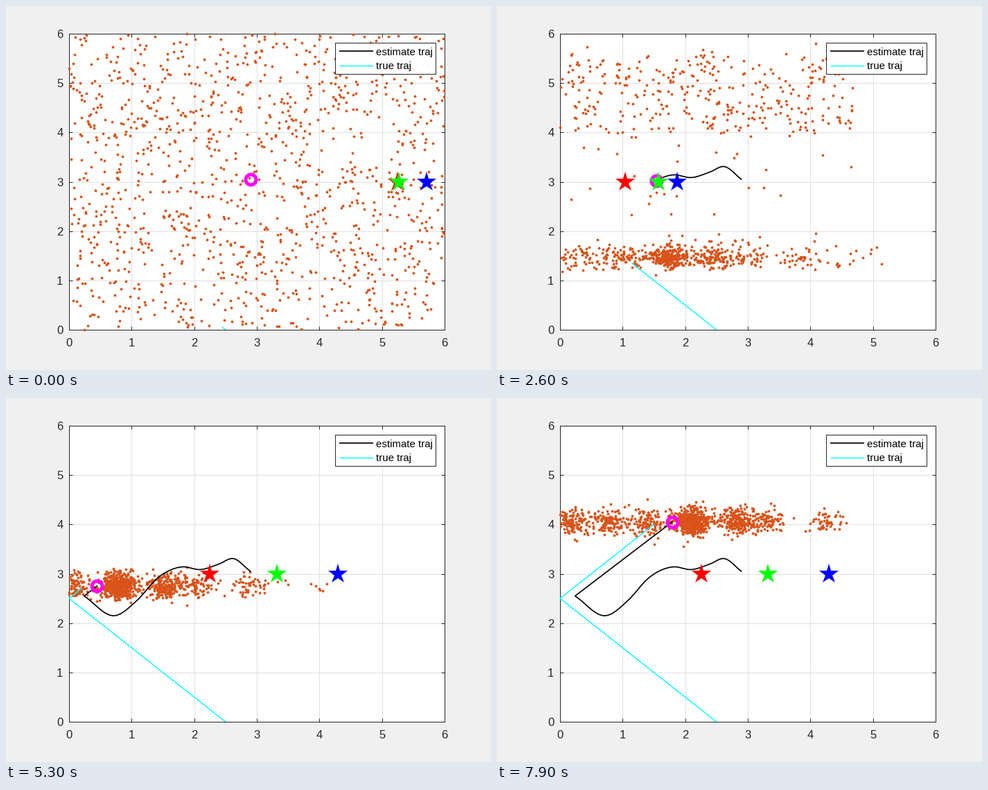
These frames come from a looping animation (700 by 525 pixels, 8000 ms). A matplotlib script:

```python
import numpy as np
import matplotlib.pyplot as plt
from matplotlib.animation import FuncAnimation
from matplotlib.patches import Rectangle

W, H, DPI = 700, 525, 100
FRAMES, BOUNCE, STEP = 80, 49, 0.05
PT = 72 / DPI  # points per pixel
INK = "#262626"
plt.rcParams["font.family"] = "Liberation Sans"
rng = np.random.default_rng(7)
ks = np.arange(FRAMES)
col = ks[:, None]

# Robot motion: up-left to the wall, then up-right
shift_x = STEP * (np.abs(col - BOUNCE) - BOUNCE)
shift_y = STEP * col
steps = np.arange(FRAMES + 1)
true_x, true_y = np.abs(2.5 - STEP * steps), STEP * steps


def smooth(x, xs, ys):
    """Cubic Hermite curve through a few key points."""
    slope = np.gradient(ys, xs)
    i = np.clip(np.searchsorted(xs, x) - 1, 0, len(xs) - 2)
    h = xs[i + 1] - xs[i]
    t = (x - xs[i]) / h
    return (ys[i] + (ys[i + 1] - ys[i]) * t * t * (3 - 2 * t)
            + h * t * (1 - t) * (slope[i] * (1 - t) - slope[i + 1] * t))


# Estimated path: a wavy way to the wall, then a straight climb
bends = np.array([(0.24, 2.55), (0.735, 2.15), (1.09, 2.465), (1.42, 2.92),
                  (1.8, 3.14), (2.1, 3.085), (2.4, 3.2), (2.62, 3.31),
                  (2.895, 3.05)])
climb = np.maximum(ks - BOUNCE, 0)
est_x = np.interp(ks, [0, 18, 42, BOUNCE], [2.895, 2.025, 0.58, 0.24])
est_y = smooth(est_x, *bends.T) + STEP * climb
est_x = est_x + 0.0517 * climb


def star_path(start, low, high, mid, width):
    """Quick drop from the first guess, then an S-curve to the final one."""
    return (low + (start - low) * np.exp(-ks / 1.2)
            + (high - low) / (1 + np.exp((mid - ks) / width)))


STARS = {
    "red": star_path(5.25, 0.79, 2.26, 32.3, 4.0),
    "lime": star_path(5.27, 0.98, 3.32, 29.8, 3.5),
    "blue": star_path(5.715, 1.39, 4.30, 31.3, 3.3),
}


def wander(n):
    """Slow unit-variance random drift, one row per frame."""
    out = rng.standard_normal((FRAMES, n))
    for k in range(1, FRAMES):
        out[k] = 0.93 * out[k - 1] + 0.37 * out[k]
    return out


def roaming(x, y, birth, death):
    """Particles that keep their place and drift with the robot."""
    n = len(x)
    return (x + shift_x + 0.02 * wander(n), y + shift_y + 0.02 * wander(n),
            (col >= birth) & (col < death))


def banded(birth, centers, weights):
    """Particles gathered in clumps at the robot's height."""
    n = len(birth)
    stray = rng.random(n) < 0.14
    home = np.where(stray, rng.uniform(0.3, 5.4, n),
                    rng.choice(centers, n, p=weights / weights.sum()))
    death = np.where(stray, 26 + rng.exponential(14, n), FRAMES)
    spread = np.interp(col, [10, 42], [0.2, 0.145])
    sigma = np.interp(col, [8, 42], [0.07, 0.13])
    tail = rng.exponential(0.22, n) * np.clip(1 - col / 40, 0, 1)
    return (home + shift_x - shift_x[-1] + spread * wander(n),
            shift_y + 0.11 + sigma * wander(n) + tail,
            (col >= birth) & (col < death))


def decoy_death(n):
    return np.clip(rng.normal(35, 4, n), 24, 50)


# Uniform start; a high decoy layer outlives the rest
N, EXTRA, LATE = 1250, 130, 150
x0, y0 = rng.uniform(0, 6, (2, N))
decoy = (y0 > 2.7) & (y0 < 4.3)
fade = 27 * np.sqrt(rng.random(N))
death = np.where(decoy, decoy_death(N), fade)
birth = np.where(decoy, death, 1.15 * fade)
clumps = np.array([0.2, 0.75, 1.38, 2.1, 2.8, 3.3, 4.25])
mass = 1 + 7 * np.exp(-((clumps - 2.25) / 0.55) ** 2)

groups = [
    roaming(x0, y0, np.zeros(N), death),
    roaming(rng.uniform(0.4, 6, EXTRA), rng.normal(3.5, 0.42, EXTRA),
            rng.uniform(4, 24, EXTRA), decoy_death(EXTRA)),
    banded(birth, clumps, mass),
    banded(rng.uniform(50, 79, LATE), clumps[:2], mass[:2]),
]
dot_x, dot_y, shown = (np.hstack(part) for part in zip(*groups))
shown &= (dot_x >= 0) & (dot_x <= 6) & (dot_y >= 0) & (dot_y <= 6)

# Stage
fig = plt.figure(figsize=(W / DPI, H / DPI), dpi=DPI, facecolor="#f0f0f0")
ax = fig.add_axes([91 / W, 1 - 467 / H, 542 / W, 427 / H])
ax.set(xlim=(0, 6), ylim=(0, 6), xticks=range(7), yticks=range(7))
ax.set_axisbelow(True)
ax.grid(color="#dfdfdf", lw=PT)
ax.tick_params(direction="in", top=True, right=True, length=5 * PT, width=PT,
               color=INK, labelcolor=INK, labelsize=12)
ax.tick_params(axis="x", pad=12 * PT)
ax.tick_params(axis="y", pad=8.5 * PT)
for spine in ax.spines.values():
    spine.set(color=INK, linewidth=PT, zorder=1.5)


def marker(shape, size, z, **style):
    return ax.plot([], [], shape, ms=size * PT, zorder=z, clip_on=False,
                   **style)[0]


dots = marker("o", 3.8, 2, color="#d95319", mew=0)
est_line, = ax.plot([], [], "k", lw=1.7 * PT, zorder=3)
true_line, = ax.plot([], [], "cyan", lw=1.4 * PT, zorder=3)
ring = marker("o", 15, 4, mfc="none", mec="magenta", mew=5 * PT)
stars = [marker("*", 30, 5 + i, color=c, mew=0) for i, c in enumerate(STARS)]

# Legend, laid out in pixels
top = fig.add_axes([0, 0, 1, 1])
top.set(xlim=(0, W), ylim=(H, 0))
top.axis("off")
top.add_patch(Rectangle((475, 53), 145, 45, fc="white", ec=INK, lw=PT))
for y, color, width, label in [(65, "black", 1.7, "estimate traj"),
                               (86, "cyan", 1.4, "true traj")]:
    top.plot([481, 530], [y, y], color=color, lw=width * PT,
             solid_capstyle="butt")
    top.text(533.5, y + 5.5, label, size=15 * PT, color="black",
             va="baseline")


def draw(k):
    on = shown[k]
    dots.set_data(dot_x[k, on], dot_y[k, on])
    est_line.set_data(est_x[:k + 1], est_y[:k + 1])
    true_line.set_data(true_x[:k + 2], true_y[:k + 2])
    ring.set_data([est_x[k]], [est_y[k]])
    for star, path in zip(stars, STARS.values()):
        star.set_data([path[k]], [3])
    return [dots, est_line, true_line, ring, *stars]


anim = FuncAnimation(fig, draw, frames=FRAMES, interval=100, repeat=True,
                     repeat_delay=0, blit=False)
plt.show()
```
